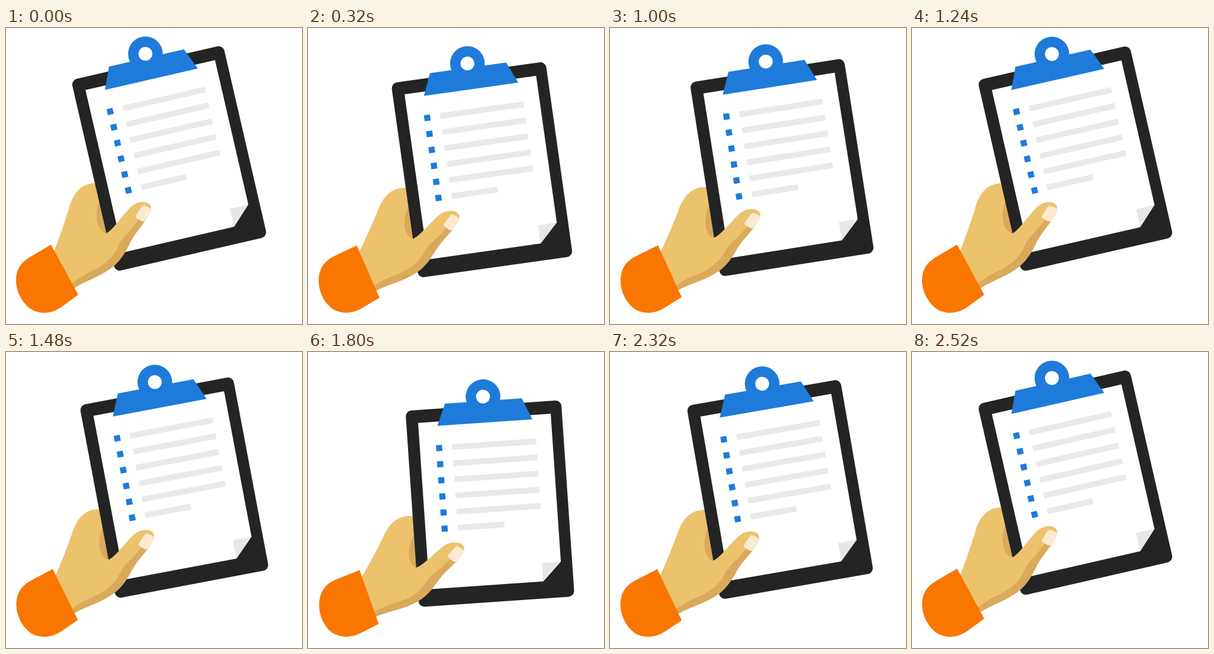
An HTML page for the animation above (2560 ms loop, 500 px wide and 500 px high).

```html
<!DOCTYPE html>
<html lang="en">
<head>
<meta charset="utf-8">
<title>Clipboard</title>
<style>
  html, body { margin: 0; height: 100%; overflow: hidden; background: #fff; }
  svg { display: block; width: 100%; height: 100%; }
</style>
</head>
<body>
<svg viewBox="0 0 500 500">
  <g id="arm">
    <!-- palm behind the board -->
    <path fill="#ecc26d" d="M80 380C90 355 98 331 106 306C113 278 128 262 151 262L210 330L185 395L112 436Z"/>
    <path fill="#d9a95c" d="M158 291C149 312 151 341 169 347L185 340Z"/>

    <!-- board, upright around the wrist -->
    <g transform="translate(65.5 438) rotate(-13)">
      <rect x="122" y="-331" width="263.5" height="332.2" rx="10" fill="#242424"/>
      <path fill="#fff" d="M142-309.3H366.5V-59L334.5-27.6H142Z"/>
      <path fill="#e6e7e8" d="M334.5-59H366.5L334.5-27.6Z"/>
      <g id="list"></g>
      <g fill="#1e7bd9">
        <path d="M189.5-338.7H319.5L335-302H174Z"/>
        <circle cx="254.4" cy="-346" r="29.3"/>
      </g>
      <circle cx="254.4" cy="-346" r="11.7" fill="#fff"/>
    </g>

    <!-- thumb in front of the board -->
    <path fill="#ecc26d" d="M152 335C156 344 162 348 169 347C180 342 195 319 209 304C217 296 228 292 237 294.500C246 297 247 305 242 314C235 329 221 342 211 360C203 377 195 391 182 402C160 420 138 425 116 439L100 400Z"/>
    <path fill="#d9a95c" d="M244 309C237 326 220 343 211 360C203 377 195 391 182 402C160 420 138 425 114 440L110 433C122 422 138 414 150 408C170 398 184 384 191 366C197 352 207 348 222 326Z"/>
    <path fill="#fbead0" d="M229 302Q231 299 235 300.500L242 303.500Q246 305.500 244.500 309L238 322Q235 328 229 326L222 322Q218 320 220 316Z"/>

    <path fill="#f97600" d="M76 366L122 450.500L94 471C80 481 64 484 48 478C30 470 16 446 17 424C18 406 26 395 42 386Z"/>
  </g>
</svg>
<script>
  const LOOP = 1280, STEP = 40, SWING = 10;
  const arm = document.getElementById('arm');

  const box = (x, y, w, h, fill) =>
    `<rect x="${x}" y="${y - h / 2}" width="${w}" height="${h}" fill="${fill}"/>`;
  document.getElementById('list').innerHTML = Array.from({ length: 6 }, (_, i) => {
    const y = -264.5 + i * 27.3;
    return box(169.3, y, 10.3, 10.3, '#1e7bd9') +
           box(196.5, y, i < 5 ? 142.5 : 79, 9.8, '#e9e9eb');
  }).join('');

  function draw() {
    const t = Math.floor(performance.now() / STEP) * STEP % LOOP;
    const x = 1 - Math.abs(1 - 2 * t / LOOP);
    const eased = x * x * (3 - 2 * x);
    arm.setAttribute('transform', `rotate(${SWING * eased} 65.5 438)`);
    requestAnimationFrame(draw);
  }
  draw();
</script>
</body>
</html>
```
